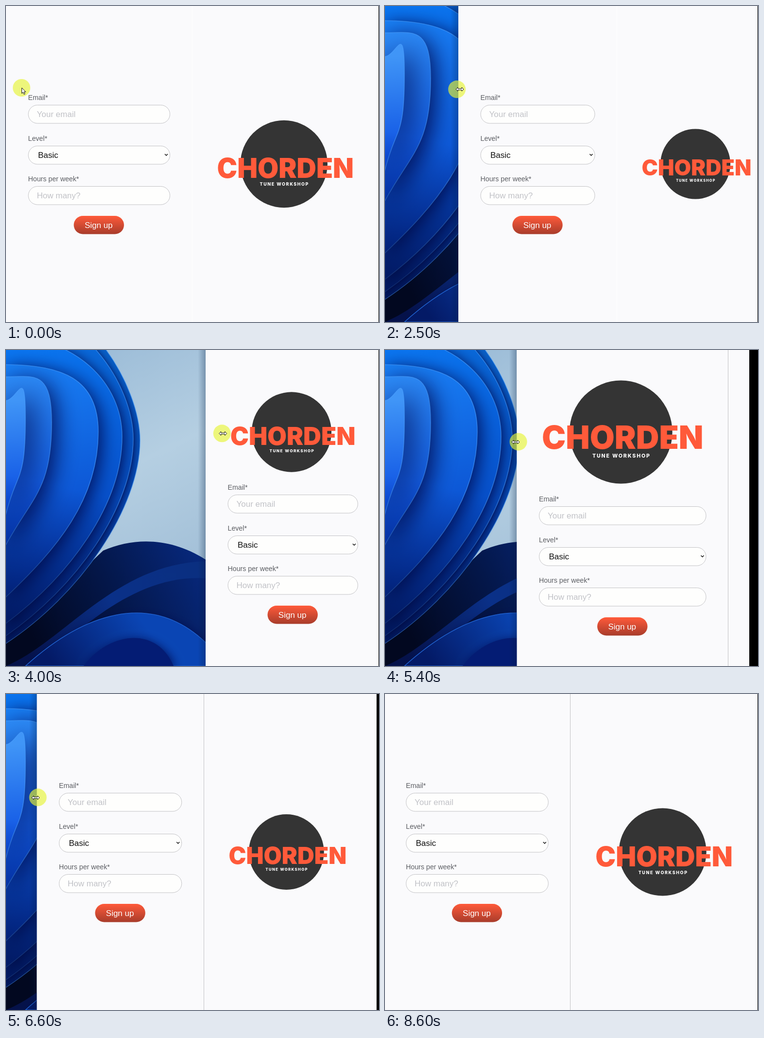
An HTML page with a canvas that plays this animation: 768 px wide and 649 px high, repeating every 9 s.

```html
<!DOCTYPE html>
<html lang="en">
<head>
<meta charset="utf-8">
<title>Responsive sign-up form</title>
<style>
  html, body { margin: 0; width: 100%; height: 100%; overflow: hidden; background: #fafafc; }
  canvas { display: block; width: 768px; height: 649px; }
</style>
</head>
<body>
<canvas id="stage" width="768" height="649"></canvas>
<script>
const ctx = document.getElementById('stage').getContext('2d');
const W = 768, H = 649, LOOP = 9000, STEP = 100;
const PAGE = '#fafafc', DARK = '#343434', ORANGE = '#ff5a3a', HINT = '#c1c2c7';
const SANS = '"Liberation Sans", Arial, sans-serif';
const PAD = 46, BREAK = 547, MID = H / 2, RIGHT = 767, MAX_EDGE = 411;
const GRAB = 1400, TURN = 4100;

// Key points of the drag: time, pointer x, pointer y, layout lag
const path = [
  [300, 32, 168, 0],
  [GRAB, 0, 183, 0],
  [2500, 154, 171, 38],
  [TURN, 449, 172, 0],
  [5400, 269, 189, -60],
  [6600, 61, 213, -15],
  [7500, -5, 227, 0],
  [8100, -8, 228, 0],
  [8700, -30, 230, 0]
];

// Slope at a key point, flat at ends and turning points
function slope(i, c) {
  const a = path[i - 1], p = path[i], b = path[i + 1];
  if (!a || !b || (p[c] - a[c]) * (b[c] - p[c]) <= 0) return 0;
  return (b[c] - a[c]) / (b[0] - a[0]);
}

function glide(t, c) {
  const last = path.length - 1;
  if (t <= path[0][0]) return path[0][c];
  if (t >= path[last][0]) return path[last][c];
  const i = path.findIndex(p => p[0] > t) - 1;
  const a = path[i], b = path[i + 1], d = b[0] - a[0], u = (t - a[0]) / d, v = 1 - u;
  return v * v * (1 + 2 * u) * a[c] + u * u * (1 + 2 * v) * b[c]
    + d * u * v * (v * slope(i, c) - u * slope(i + 1, c));
}

function windowEdge(t) {
  if (t < GRAB) return 0;
  const out = t < TURN;
  return Math.min(MAX_EDGE, Math.max(out ? 0 : -2.5, glide(t, 1) + (out ? -3 : 2.5)));
}

function gradient(x0, y0, x1, y1, ...colors) {
  const g = ctx.createLinearGradient(x0, y0, x1, y1);
  colors.forEach((c, i) => g.addColorStop(i / (colors.length - 1), c));
  return g;
}

function shape(d, fill, stroke, width = 1, shade = 0) {
  const p = new Path2D(d);
  ctx.shadowColor = 'rgba(0,10,80,.9)';
  ctx.shadowBlur = shade;
  ctx.shadowOffsetX = ctx.shadowOffsetY = shade / 5;
  if (shade === 0) ctx.shadowColor = 'transparent';
  if (fill) { ctx.fillStyle = fill; ctx.fill(p); }
  ctx.shadowColor = 'transparent';
  if (stroke) { ctx.strokeStyle = stroke; ctx.lineWidth = width; ctx.stroke(p); }
}

function pill(x, y, w, h, fill, stroke) {
  ctx.beginPath();
  ctx.roundRect(x, y, w, h, h / 2);
  ctx.fillStyle = fill;
  ctx.fill();
  if (stroke) { ctx.strokeStyle = stroke; ctx.lineWidth = 1; ctx.stroke(); }
}

function disc(x, y, r, fill) {
  ctx.beginPath();
  ctx.arc(x, y, r, 0, Math.PI * 2);
  ctx.fillStyle = fill;
  ctx.fill();
}

function text(s, x, y, font, color, align = 'left') {
  ctx.font = font;
  ctx.fillStyle = color;
  ctx.textAlign = align;
  ctx.fillText(s, x, y);
}

function petal(right, top) {
  const mid = 130 + right * .2, bottom = 300 + right * 1.1;
  return `M-2 ${top} C${right * .6} ${top} ${right} ${mid - 110} ${right} ${mid}
    C${right} ${mid + 140} ${right * .55} ${bottom - 100} -2 ${bottom}Z`;
}

function wallpaper(edge) {
  ctx.save();
  ctx.beginPath();
  ctx.rect(0, 0, edge, H);
  ctx.clip();
  ctx.fillStyle = gradient(200, 0, 411, 430, '#9dbdd8', '#b5cfe2', '#a3c0d8');
  ctx.fillRect(0, 0, edge, H);
  shape('M-2 649 L-2 560 Q110 500 200 412 C270 382 350 386 425 440 L425 649Z',
    gradient(60, 600, 400, 430, '#020820', '#04174a', '#07287c'));
  shape('M0 649 C120 600 230 430 425 434 L425 470 C260 450 130 600 60 649Z',
    gradient(50, 640, 411, 440, '#05124a', '#0a3088', '#0a2f80'));
  shape('M40 649 C150 550 300 480 425 615 L425 649Z',
    gradient(100, 649, 260, 530, '#041a66', '#0a45b4'), '#1f60cc', 1.5, 20);
  shape('M160 649 C210 580 310 565 345 649Z', '#041c74', null, 0, 20);
  const rims = [[276, -120], [262, -90], [239, -28], [190, 30], [94, 55], [40, 104]];
  rims.forEach(([right, top], i) => shape(petal(right, top),
    gradient(0, Math.max(top, 0), right * .5, 300 + right, `hsl(212,92%,${41 + 4 * i}%)`, `hsl(222,95%,${30 + 3 * i}%)`),
    'rgba(75,160,255,.6)', 1.5, i * 12));
  shape(petal(...rims[0]), gradient(110, 280, 50, 560, 'rgba(0,10,60,0)', 'rgba(0,10,60,.65)'));
  ctx.fillStyle = gradient(edge - 16, 0, edge, 0, 'rgba(0,25,60,0)', 'rgba(0,25,60,.3)');
  ctx.fillRect(edge - 16, 0, 16, H);
  ctx.restore();
}

function logo(cx, cy, w) {
  const k = w / 288;
  disc(cx - 3 * k, cy, 90 * k, DARK);
  text('CHORDEN', cx, cy + 29 * k, `900 ${56 * k}px Inter, sans-serif`, ORANGE, 'center');
  ctx.letterSpacing = 1.6 * k + 'px';
  text('TUNE WORKSHOP', cx - 2 * k, cy + 45 * k, `800 ${9 * k}px Inter, sans-serif`, '#fff', 'center');
  ctx.letterSpacing = '0px';
}

function field(label, value, color, x, y, w, indent) {
  text(label, x - .5, y - 10, '14.2px ' + SANS, '#5c5e63');
  pill(x, y + .5, w, 37.5, '#fefefd', '#c3c3c6');
  text(value, x + indent, y + 25, '17px ' + SANS, color);
}

function form(x, w, y) {
  const rows = [['Email*', 'Your email', HINT, 17.5], ['Level*', 'Basic', '#111', 20], ['Hours per week*', 'How many?', HINT, 17.5]];
  rows.forEach(([label, value, color, indent], i) =>
    field(label, value, color, x, Math.round(y + 83.6 * i), w, indent));
  shape(`M${x + w - 10.5} ${y + 101} l3 3 l3 -3`, null, '#111', 1.5);
  const mid = x + w / 2 - .5, top = y + 228;
  pill(mid - 51.7, top, 103.4, 37.5, gradient(0, top, 0, top + 37.5, '#ff5a3a', '#a83c2b'));
  text('Sign up', mid - .5, top + 25, '17px ' + SANS, '#fff', 'center');
}

function page(t, edge, lag) {
  const width = RIGHT + lag - edge;
  const wide = width > BREAK;
  const panel = wide ? width / 2 : width;
  const split = edge + panel;
  const mark = panel - 96.5, markH = mark * .63;
  const drop = wide ? 0 : (markH + 23) / 2;
  ctx.fillStyle = PAGE;
  ctx.fillRect(edge, 0, W - edge, H);
  ctx.fillStyle = t < TURN ? '#fff' : '#c2c2c5';
  ctx.fillRect(Math.floor(split - .5), 0, 1, H);
  form(edge + PAD, panel - 2 * PAD, 203 + Math.round(drop));
  if (wide) logo(split + panel / 2, MID, mark);
  else logo(edge + panel / 2, MID - 156, mark);
}

function cursor(t) {
  disc(glide(t - 35, 1), glide(t - 35, 2), 18, 'rgba(231,244,55,.65)');
  const x = glide(t, 1), y = glide(t, 2);
  ctx.lineJoin = 'round';
  if (t < 1000) {
    shape(`M${x + .5} ${y} v11.5 l2.6 -2.4 l2 4.4 l2 -.9 l-2 -4.2 h3.6Z`, '#fff', '#111');
  } else {
    shape(`M${x - 8} ${y} l4 -4 v2.6 h8 v-2.6 l4 4 l-4 4 v-2.6 h-8 v2.6Z`, '#fff', '#111');
  }
}

function draw(t) {
  const edge = windowEdge(t), lag = glide(t, 3);
  ctx.clearRect(0, 0, W, H);
  if (edge > 0) wallpaper(edge);
  page(t, edge, lag);
  const right = RIGHT - Math.round(Math.max(0, -lag * .28));
  ctx.fillStyle = '#000';
  ctx.fillRect(right, 0, W - right, H);
  cursor(t);
}

const start = performance.now();
function tick() {
  const t = (performance.now() - start) % LOOP;
  draw(Math.floor(t / STEP) * STEP);
  requestAnimationFrame(tick);
}
tick();
</script>
</body>
</html>
```
